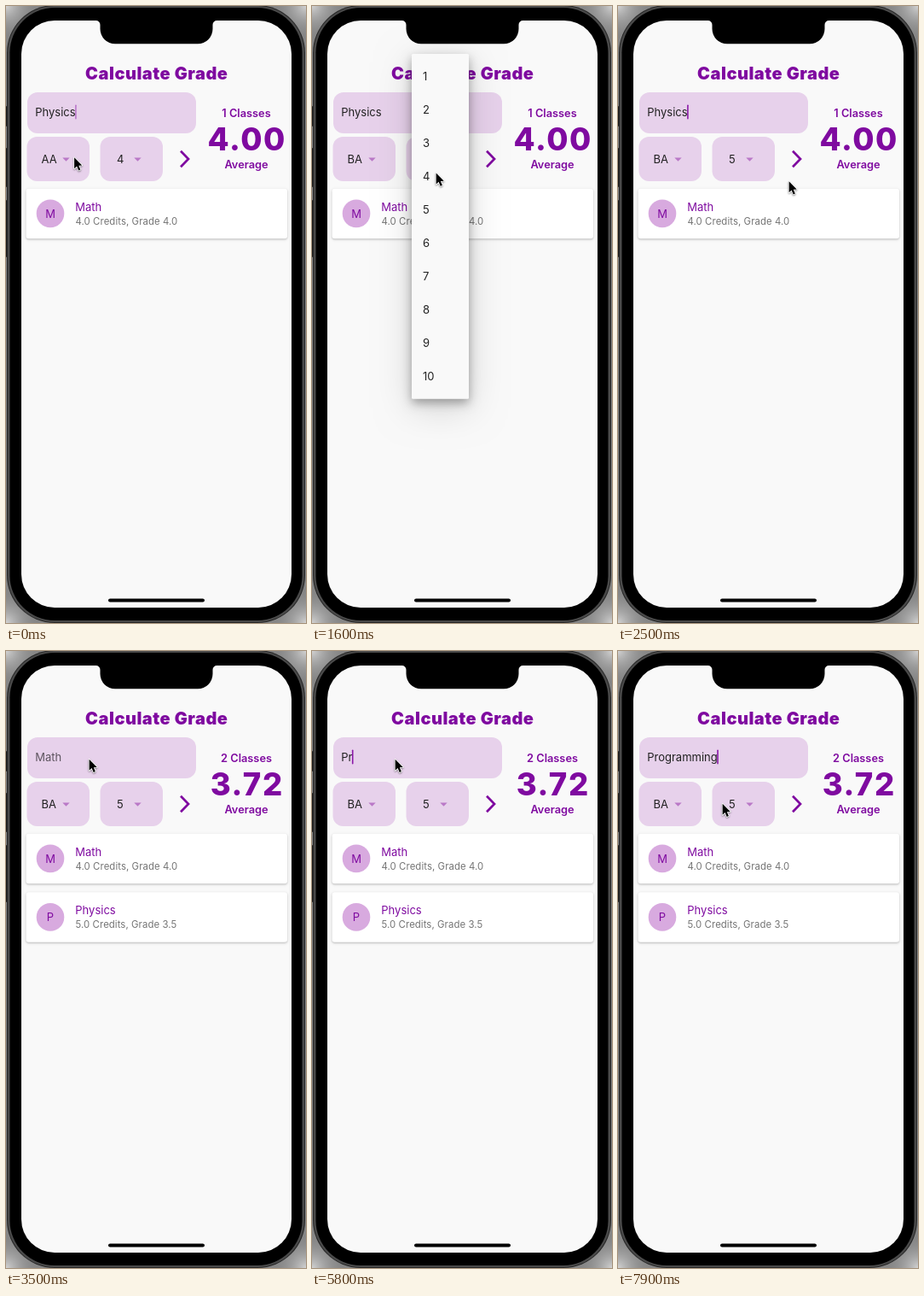
Recreate the animation shown at these times as an HTML page with a canvas. Size 352 px wide and 722 px high, loop 8000 ms.

```html
<!DOCTYPE html>
<html lang="en">
<head>
<meta charset="utf-8">
<title>Calculate Grade</title>
<style>
html, body { margin: 0; width: 100%; height: 100%; overflow: hidden; background: #000; }
canvas { display: block; width: 352px; height: 722px; }
</style>
</head>
<body>
<canvas id="stage" width="352" height="722"></canvas>
<script>
const ctx = document.getElementById('stage').getContext('2d');
const LOOP = 8000;
const FONT = 'Inter, Roboto, sans-serif';
const PURPLE = '#7f0aa0', CHIP = '#e7d1eb', AVATAR = '#d8aadf', INK = '#212121', PAPER = '#f9f9f9';
const SCREEN = [18, 17, 317, 687, 39];

const ADD_AT = 2850;
const MENUS = [
  { open: 80, close: 960, x: 28.5, y: 153, w: 71.5, textX: 41.5, selected: 0,
    items: ['AA', 'BA', 'BB', 'CB', 'CC', 'DC', 'DD', 'FD', 'FF'] },
  { open: 1270, close: 1860, x: 117, y: 56, w: 67, textX: 130, selected: 3,
    items: ['1', '2', '3', '4', '5', '6', '7', '8', '9', '10'] }
];
// time, x, y of the pointer tip
const PATH = [
  [0, 79.5, 176.5], [350, 79.5, 176.5], [750, 57, 217], [980, 57, 217],
  [1220, 145, 182], [1400, 145, 182], [1580, 145, 194.5], [1620, 145, 195],
  [1780, 146, 232], [1950, 146, 232], [2400, 200, 204.5], [2520, 200, 204.5],
  [2720, 208, 181], [2980, 208, 181], [3500, 97, 126], [7250, 97, 126], [7800, 122, 178]
];
const WORD = 'Programming';
const KEYS = [5550, 5800, 6050, 6260, 6300, 6380, 6440, 6500, 6540, 6590, 6680];
const CARET_EPOCHS = [-560, 1000, 2000, ADD_AT, ...KEYS];

const clamp = v => Math.max(0, Math.min(1, v));
const ease = v => v * v * (3 - 2 * v);
const mix = (a, b, k) => a + (b - a) * k;

function box(x, y, w, h, r, fill) {
  ctx.beginPath();
  ctx.roundRect(x, y, w, h, r);
  ctx.fillStyle = fill;
  ctx.fill();
}

function shadowBox(x, y, w, h, r, fill, shadows) {
  ctx.save();
  for (const [dy, blur, alpha] of shadows) {
    ctx.shadowColor = `rgba(0,0,0,${alpha})`;
    ctx.shadowOffsetY = dy;
    ctx.shadowBlur = blur;
    box(x, y, w, h, r, fill);
  }
  ctx.restore();
}

// y is the middle of the capitals
function label(str, x, y, size, color, { weight = 400, align = 'left', gap = 0 } = {}) {
  ctx.font = `${weight} ${size}px ${FONT}`;
  ctx.letterSpacing = `${gap}px`;
  ctx.textAlign = align;
  ctx.fillStyle = color;
  ctx.fillText(str, align === 'center' ? x + gap / 2 : x, y + size * 0.364);
}

function poly(points, fill) {
  ctx.beginPath();
  points.forEach(([x, y]) => ctx.lineTo(x, y));
  ctx.closePath();
  ctx.fillStyle = fill;
  ctx.fill();
}

function phone() {
  ctx.fillStyle = '#858585';
  ctx.fillRect(0, 0, 352, 722);
  for (const x of [0, 352]) {
    for (const y of [0, 722]) {
      const g = ctx.createRadialGradient(x, y, 0, x, y, 40);
      g.addColorStop(0, '#d2d2d2');
      g.addColorStop(1, 'rgba(133,133,133,0)');
      ctx.fillStyle = g;
      ctx.fillRect(x ? 312 : 0, y ? 682 : 0, 40, 40);
    }
  }
  box(0, 117, 4, 24, 1, '#1c1c1c');
  box(0, 166, 4, 46, 1, '#1c1c1c');
  box(0, 227, 4, 67, 1, '#1c1c1c');
  box(1, -1, 350, 723, 56, '#262626');
  box(2, 0, 348, 721, 55, '#4a4a4a');
  box(4.5, 2, 343, 717, 52.5, '#000');
  box(...SCREEN, PAPER);
}

function notch() {
  ctx.beginPath();
  ctx.moveTo(105, 16);
  ctx.lineTo(248, 16);
  ctx.lineTo(248, 17);
  ctx.arcTo(242.5, 17, 242.5, 22, 5);
  ctx.arcTo(242.5, 44.3, 226, 44.3, 17.5);
  ctx.arcTo(110.5, 44.3, 110.5, 28, 17.5);
  ctx.arcTo(110.5, 17, 105, 17, 5);
  ctx.lineTo(105, 17);
  ctx.fillStyle = '#000';
  ctx.fill();
  box(120, 693.4, 113, 4.2, 2.1, '#000');
}

function chip(x, value, textX, arrowX) {
  box(x, 153, 73.5, 52, 12, CHIP);
  label(value, textX, 179, 13, INK);
  poly([[arrowX - 4.2, 177.5], [arrowX + 4.2, 177.5], [arrowX, 181.8]], '#ba78c7');
}

function card(y, name, detail) {
  shadowBox(23.5, y, 306.5, 58.5, 3, '#fff', [[1, 2.5, 0.28]]);
  ctx.beginPath();
  ctx.arc(52, y + 29.2, 16.3, 0, 7);
  ctx.fillStyle = AVATAR;
  ctx.fill();
  label(name[0], 52, y + 29.2, 13, PURPLE, { align: 'center' });
  label(name, 81.3, y + 21.3, 13, PURPLE);
  label(detail, 81.5, y + 38, 11.38, '#757575', { gap: 0.07 });
}

function caretAlpha(t) {
  if (MENUS.some(m => t >= m.open && t < m.close + 80)) return 0;
  const epoch = CARET_EPOCHS.filter(e => e <= t).pop();
  const age = t - epoch;
  if (age <= 500) return 1;
  const p = age % 1000;
  return p < 500 ? clamp(p / 120) : 1 - clamp((p - 500) / 120);
}

function field(t) {
  box(25, 101, 198, 48, 12, CHIP);
  const typed = t < ADD_AT ? 'Physics' : WORD.slice(0, KEYS.filter(k => k <= t).length);
  label(typed || 'Math', 34.2, 124, 13, typed ? INK : 'rgba(0,0,0,.6)');
  const end = typed ? ctx.measureText(typed).width : 0;
  ctx.globalAlpha = caretAlpha(t);
  box(34 + end - 0.3, 115.5, 1.6, 17, 0.8, '#8a17a8');
  ctx.globalAlpha = 1;
}

function summary(added) {
  const small = { weight: 600, align: 'center' };
  label(added ? '2 Classes' : '1 Classes', 282, 125.5, 12.8, PURPLE, small);
  label(added ? '3.72' : '4.00', 282, 155.3, 36.6, PURPLE, { weight: 800, align: 'center', gap: 1.5 });
  label('Average', 282, 185, 12.8, PURPLE, small);
}

function menu(m, t) {
  if (t < m.open || t > m.close + 75) return;
  const k = clamp((t - m.open) / 300);
  const fade = t < m.close ? clamp(k / 0.25) : 1 - (t - m.close) / 75;
  const grow = ease(clamp((k - 0.25) / 0.25));
  const n = m.items.length;
  const itemY = i => m.y + 26 + 39 * i;
  const top = mix(itemY(m.selected) - 19.5, m.y, grow);
  const bottom = mix(itemY(m.selected) + 19.5, m.y + 39 * n + 13.8, grow);
  ctx.save();
  ctx.globalAlpha = fade;
  shadowBox(m.x, top, m.w, bottom - top, 1.5, PAPER, [[10, 42, 0.16], [5, 12, 0.32]]);
  ctx.beginPath();
  ctx.rect(m.x, top, m.w, bottom - top);
  ctx.clip();
  const unit = 0.5 / (n + 1.5);
  m.items.forEach((item, i) => {
    const shown = i === m.selected ? 1 : clamp((k - 0.5 - (i + 1) * unit) / (1.5 * unit));
    ctx.globalAlpha = fade * shown;
    label(item, m.textX, itemY(i), 13, INK);
  });
  ctx.restore();
}

function pointer(t) {
  let i = PATH.findIndex(p => p[0] > t);
  if (i < 0) i = PATH.length;
  const a = PATH[i - 1], b = PATH[i] || a;
  const k = b === a ? 0 : ease((t - a[0]) / (b[0] - a[0]));
  ctx.save();
  ctx.translate(mix(a[1], b[1], k), mix(a[2], b[2], k));
  ctx.scale(1.06, 1.06);
  ctx.shadowColor = 'rgba(0,0,0,.35)';
  ctx.shadowBlur = 2;
  ctx.shadowOffsetY = 1;
  const shape = [[0.6, 0.8], [0.6, 13], [3.4, 10.4], [5.4, 15], [7.4, 14.1], [5.5, 9.6], [9.2, 9.4]];
  poly(shape, '#000');
  ctx.strokeStyle = '#fff';
  ctx.lineWidth = 1.6;
  ctx.lineJoin = 'round';
  ctx.stroke();
  ctx.shadowColor = 'transparent';
  poly(shape, '#000');
  ctx.restore();
}

function draw(t) {
  const added = t >= ADD_AT;
  phone();
  label('Calculate Grade', 176.5, 78.3, 20, PURPLE, { weight: 900, align: 'center', gap: 0.5 });
  field(t);
  chip(24.5, t < MENUS[0].close ? 'AA' : 'BA', 41.5, 70.5);
  chip(110.5, t < MENUS[1].close ? '4' : '5', 130, 154.5);
  ctx.beginPath();
  ctx.moveTo(205, 169.8);
  ctx.lineTo(214, 179);
  ctx.lineTo(205, 188.2);
  ctx.strokeStyle = PURPLE;
  ctx.lineWidth = 2.7;
  ctx.lineJoin = 'miter';
  ctx.stroke();
  summary(added);
  card(213.7, 'Math', '4.0 Credits, Grade 4.0');
  if (added) card(282.2, 'Physics', '5.0 Credits, Grade 3.5');
  ctx.save();
  ctx.beginPath();
  ctx.roundRect(...SCREEN);
  ctx.clip();
  MENUS.forEach(m => menu(m, t));
  ctx.restore();
  notch();
  pointer(t);
}

const start = performance.now();
function tick() {
  draw((performance.now() - start) % LOOP);
  requestAnimationFrame(tick);
}
tick();
</script>
</body>
</html>
```
